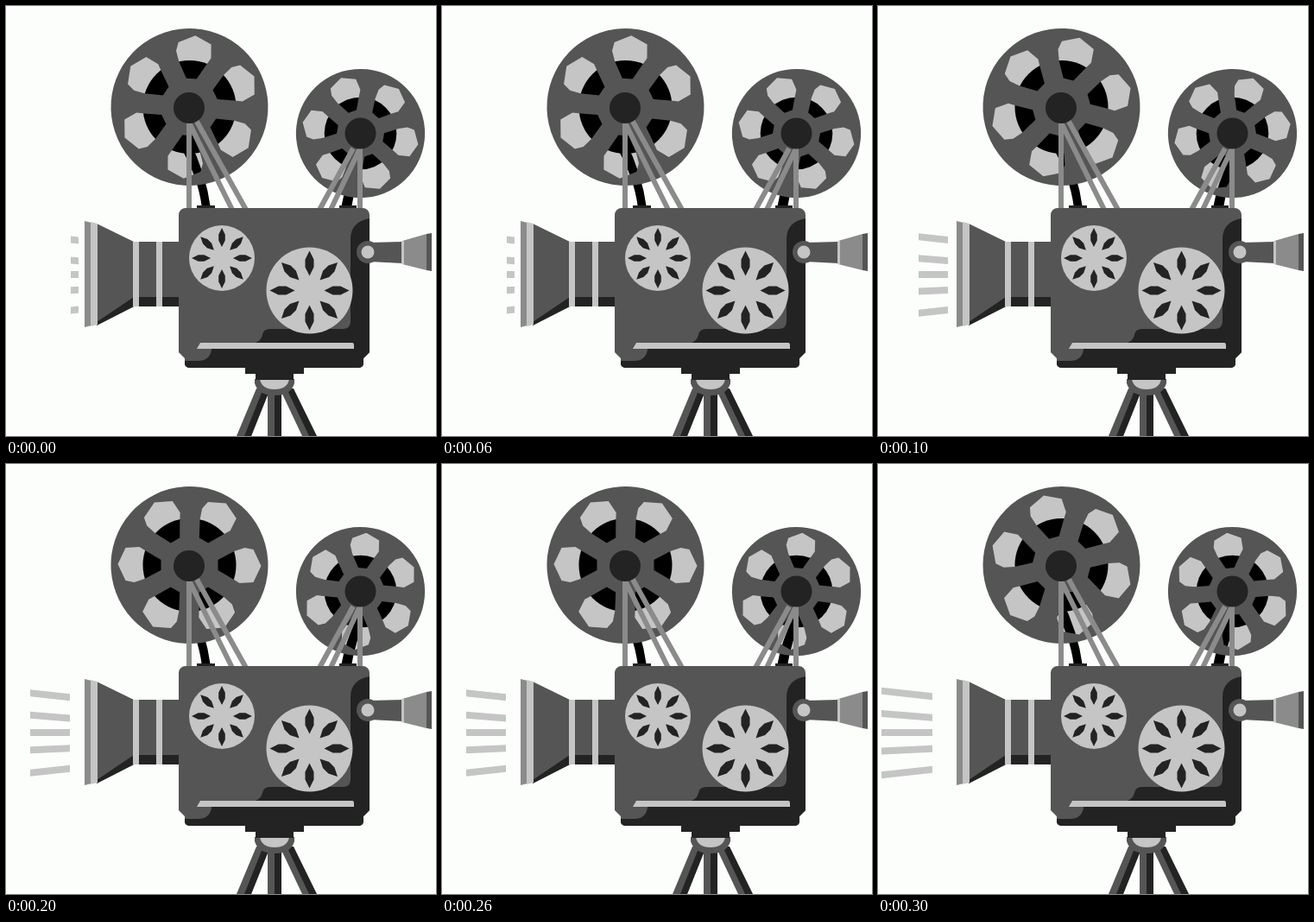
These frames come from a looping animation (498x498 px, 0.4 s). An HTML page:

```html
<!DOCTYPE html>
<html lang="en">
<head>
<meta charset="utf-8">
<title>Film camera</title>
<style>
  html, body { margin: 0; width: 100%; height: 100%; overflow: hidden; background: #fcfefc; }
  svg { display: block; width: 100vw; height: 100vh; }
  .body { fill: #555; }
  .dark { fill: #232323; }
  .mid { fill: #8b8b8b; }
  .light { fill: #c5c5c5; }
  .strut { stroke: #8b8b8b; stroke-width: 6; fill: none; }
</style>
</head>
<body>
<svg viewBox="0 0 498 498">
  <path id="rays" class="light"/>

  <!-- Large reel -->
  <g transform="translate(212.5 117)">
    <circle class="light" r="88"/>
    <circle r="54"/>
  </g>
  <path d="M200 160Q222 195 227 234H237Q232 195 212 155Z"/>
  <g transform="translate(212.5 117)"><path id="largeReel" class="body" fill-rule="evenodd"/></g>
  <path class="strut" d="M212 130V236M213 137L262 236M220 132L278 236"/>
  <circle class="dark" cx="212" cy="118" r="18"/>

  <!-- Small reel -->
  <g transform="translate(410.5 147.5) scale(.82)">
    <circle class="light" r="88"/>
    <circle r="51"/>
  </g>
  <path d="M388 234Q393 205 408 175H419Q404 205 400 234Z"/>
  <g transform="translate(410.5 147.5) scale(.82)"><path id="smallReel" class="body" fill-rule="evenodd"/></g>
  <path class="strut" d="M410 160V236M409 167L376 236M402 165L363 236"/>
  <circle class="dark" cx="410.500" cy="147.500" r="18"/>

  <!-- Lens -->
  <path class="body" d="M105 252L148 273H201V348H148L105 370Z"/>
  <path class="dark" d="M105 370V366L148 337H201V348H148Z"/>
  <path class="mid" d="M91 249L99 251V370L91 372Z"/>
  <path class="light" d="M98 250L106 252V369L98 371ZM147 273H154V348H147ZM174 273H181V348H174Z"/>

  <!-- Housing -->
  <path class="dark" d="M221 231H242V236H221ZM386 231H406V236H386Z"/>
  <path class="body" d="M208 234H413A8 8 0 0 1 421 242V401L414 408V414A5 5 0 0 1 409 419H212A5 5 0 0 1 207 414V408L200 401V242A8 8 0 0 1 208 234Z"/>
  <path class="dark" d="M421 246Q399 250 399 270V365Q399 374 390 374H306Q298 374 297 381Q295 390 284 391H238V398Q236 411 222 411H207V414A5 5 0 0 0 212 419H409A5 5 0 0 0 414 414V408L421 401Z"/>
  <path class="light" d="M225 390H401Q403 390 403 393V397H221Z"/>
  <g id="vents"></g>

  <!-- Viewfinder -->
  <path class="body" d="M421 274L459 273V298L421 296Z"/>
  <circle class="body" cx="419" cy="285" r="13"/>
  <circle class="light" cx="419" cy="285" r="7.500"/>
  <path class="mid" d="M459 272L487 264V306L459 299Z"/>
  <path class="light" d="M458 272H461V299H458Z"/>
  <path class="body" d="M487 264L493 263V307L487 306Z"/>

  <!-- Tripod -->
  <path class="body" d="M290 443H306L284 498H267ZM303 443H311V498H303ZM317 443H326L352 498H343Z"/>
  <path class="dark" d="M298 443H306L284 498H276ZM311 443H319V498H311ZM325 443H333L360 498H351Z"/>
  <path class="body" d="M288 432H334V437Q330 451 311 451Q292 451 288 437Z"/>
  <path class="light" d="M294 432H328Q326 444 311 444Q296 444 294 432Z"/>
  <path class="dark" d="M277 418H345V426H333V433H289V426H277Z"/>
</svg>
<script>
  const byId = id => document.getElementById(id);

  // Polygon given as [x, y] pairs, turned around the origin.
  function turned(points, degrees) {
    const a = degrees * Math.PI / 180, c = Math.cos(a), s = Math.sin(a);
    return 'M' + points.map(([x, y]) =>
      `${(x * c - y * s).toFixed(2)} ${(x * s + y * c).toFixed(2)}`).join('L') + 'Z';
  }

  const ring = (points, count) =>
    Array.from({ length: count }, (_, i) => turned(points, i * 360 / count)).join('');

  const opening = [[1, -83], [20, -74], [21, -58], [16, -50], [6, -33], [-6, -33], [-16, -52], [-20, -64], [-18, -74]];
  const reel = 'M-91 0A91 91 0 1 1 91 0A91 91 0 1 1 -91 0Z' + ring(opening, 6);
  const reels = [byId('largeReel'), byId('smallReel')];
  reels.forEach(r => r.setAttribute('d', reel));

  const petal = [[0, -46], [5, -36], [5, -27], [0, -17], [-5, -27], [-5, -36]];
  const vent = (x, y, scale) => `<g transform="translate(${x} ${y}) scale(${scale})">
    <circle class="light" r="50"/><path class="dark" d="${ring(petal, 8)}"/></g>`;
  byId('vents').innerHTML = vent(250, 292, .76) + vent(351.5, 329.5, 1);

  // Each ray: height at x = 80 and slope.
  const rays = [[271, .11], [295, .08], [311, 0], [329, -.045], [352, -.11]];
  const poses = [
    { large: 4, small: 40, from: 75, to: 84 },
    { large: 14, small: 20, from: 47, to: 81 },
    { large: 30, small: 5, from: 28, to: 74 },
    { large: 45, small: -6, from: 4, to: 63 }
  ];

  function draw(now) {
    const { large, small, from, to } = poses[Math.floor(now / 100) % poses.length];
    reels[0].setAttribute('transform', `rotate(${large})`);
    reels[1].setAttribute('transform', `rotate(${small})`);
    byId('rays').setAttribute('d', rays.map(([y, slope]) => {
      const left = y + (from - 80) * slope, right = y + (to - 80) * slope;
      return `M${from} ${left - 4}L${to} ${right - 4}V${right + 4}L${from} ${left + 4}Z`;
    }).join(''));
  }

  const start = performance.now();
  function tick() {
    draw(performance.now() - start);
    requestAnimationFrame(tick);
  }
  tick();
</script>
</body>
</html>
```
